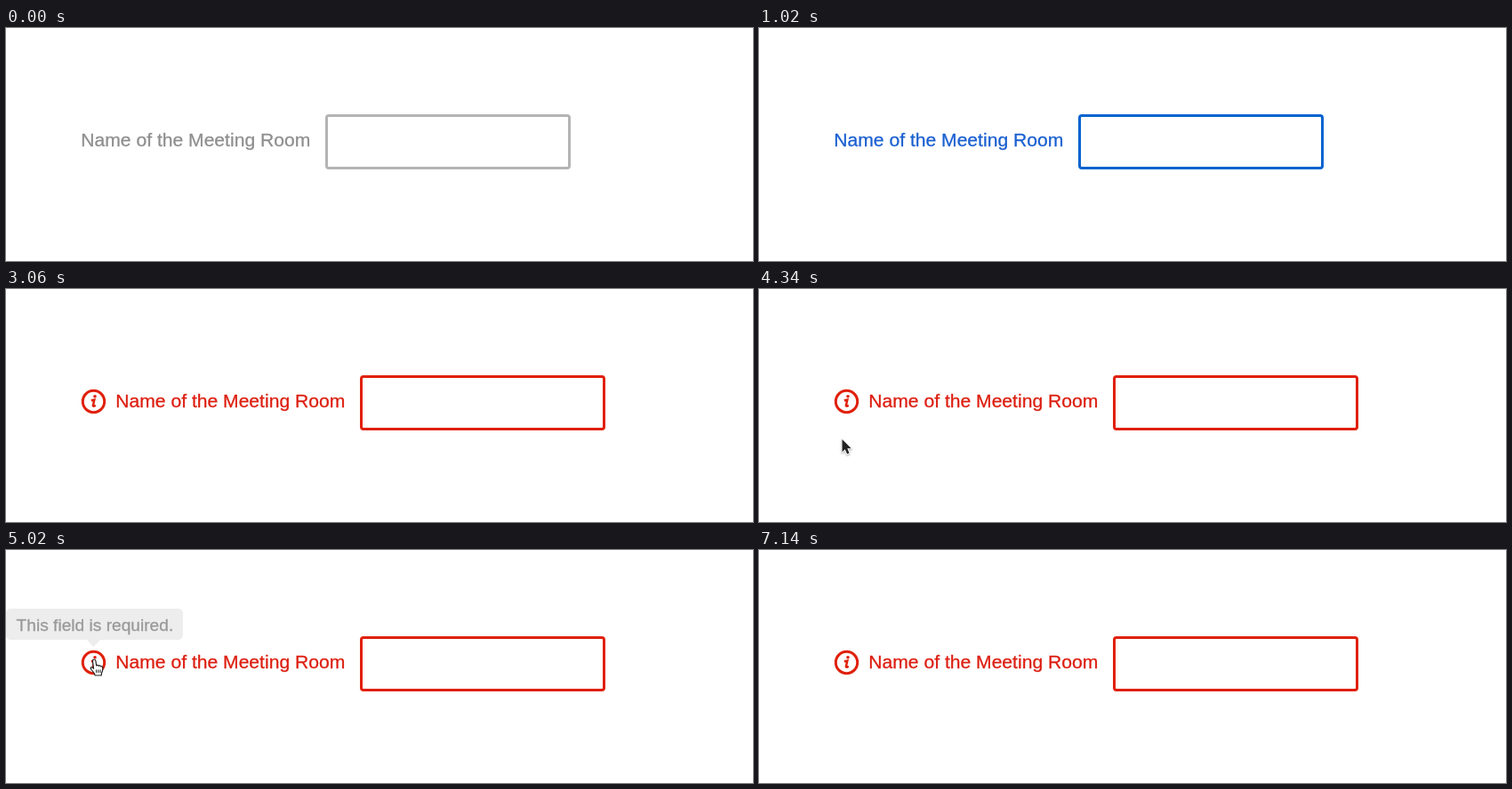
Recreate the animation shown at these times as an HTML page with a canvas. Size 840 by 262 pixels, loop 8 s.

```html
<!DOCTYPE html>
<html lang="en">
<head>
<meta charset="utf-8">
<title>Required field</title>
<style>
  html, body { margin: 0; width: 100%; height: 100%; overflow: hidden; background: #fff; }
  canvas { display: block; width: 840px; height: 262px; }
</style>
</head>
<body>
<canvas id="stage" width="840" height="262"></canvas>
<script>
const ctx = document.getElementById('stage').getContext('2d');
const LOOP = 8000, STEP = 40;
const FONT = '"Liberation Sans", Arial, Helvetica, sans-serif';

const GRAY_TEXT = [142, 142, 142], GRAY_LINE = [180, 180, 180];
const BLUE_TEXT = [26, 95, 208], BLUE_LINE = [4, 99, 207];
const RED_TEXT = [220, 30, 16], RED_LINE = [224, 32, 10];

const ARROW = new Path2D('M0 0V14.2L3.3 11.2 5.6 16.6 8 15.6 5.8 10.3H10.2Z');
const HAND = new Path2D('M-.5 2Q-.5 0 1.2 0Q2.8 0 3 2L3.6 7Q5 5.6 6.2 7.4Q7.6 6.2 8.6 8' +
  'Q10.5 7.4 10.8 9.5L10.5 13 9.3 16V18H2L1.6 16-2 11.5Q-3.6 9.4-2 8.8Q-.8 8.6.5 10.3Z');
const HAND_LINES = new Path2D('M3.6 11.5V15M5.8 11.5V15M8 11.5V15');
const INFO_STEM = new Path2D('M95.8 125.2L99.4 124.6 97.8 131.2Q97.8 132.4 100.8 130.9');

const clamp = v => Math.max(0, Math.min(1, v));
const span = (t, a, b) => clamp((t - a) / (b - a));
const ease = p => p * p * (3 - 2 * p);
const lerp = (a, b, p) => a + (b - a) * p;
const rgb = c => `rgb(${c.map(Math.round).join(',')})`;
const mix = (a, b, p) => rgb(a.map((v, i) => lerp(v, b[i], p)));

function text(str, x, y, size, color) {
  ctx.font = `${size}px ${FONT}`;
  ctx.fillStyle = ctx.strokeStyle = color;
  ctx.lineWidth = 0.3;
  ctx.fillText(str, x, y);
  ctx.strokeText(str, x, y);
}

function field(shift, textColor, lineColor) {
  text('Name of the Meeting Room', 84.3 + shift, 133, 21.1, textColor);
  ctx.strokeStyle = lineColor;
  ctx.lineWidth = 3;
  ctx.beginPath();
  ctx.roundRect(360.5 + shift, 98.5, 273, 59, 2.5);
  ctx.stroke();
}

function infoIcon(alpha) {
  ctx.save();
  ctx.globalAlpha = alpha;
  ctx.strokeStyle = ctx.fillStyle = rgb(RED_LINE);
  ctx.lineWidth = 3;
  ctx.beginPath();
  ctx.arc(98.5, 126.5, 12.2, 0, 7);
  ctx.stroke();
  ctx.lineWidth = 2.4;
  ctx.stroke(INFO_STEM);
  ctx.beginPath();
  ctx.arc(100, 120.8, 1.8, 0, 7);
  ctx.fill();
  ctx.restore();
}

function tooltip(alpha) {
  ctx.save();
  ctx.globalAlpha = alpha;
  ctx.fillStyle = '#ededed';
  ctx.beginPath();
  ctx.roundRect(0, 66, 199, 35, 5);
  ctx.moveTo(91, 101);
  ctx.lineTo(106, 101);
  ctx.lineTo(98.5, 109);
  ctx.fill();
  text('This field is required.', 11.6, 91, 19.15, '#999');
  ctx.restore();
}

function arrow(x, y) {
  ctx.save();
  ctx.translate(x, y);
  ctx.lineJoin = 'round';
  ctx.shadowColor = 'rgba(0,0,0,.35)';
  ctx.shadowBlur = 2;
  ctx.shadowOffsetY = 1;
  ctx.strokeStyle = '#fff';
  ctx.lineWidth = 2;
  ctx.stroke(ARROW);
  ctx.shadowColor = 'transparent';
  ctx.fillStyle = '#222';
  ctx.fill(ARROW);
  ctx.restore();
}

function hand(x, y) {
  ctx.save();
  ctx.translate(x, y);
  ctx.lineJoin = 'round';
  ctx.fillStyle = '#fff';
  ctx.strokeStyle = '#222';
  ctx.lineWidth = 1.2;
  ctx.fill(HAND);
  ctx.stroke(HAND);
  ctx.lineWidth = 1;
  ctx.stroke(HAND_LINES);
  ctx.restore();
}

function pointer(t) {
  if (t < 4340 || t >= 7060) return;
  const enter = ease(span(t, 4340, 4940));
  const leave = span(t, 6900, 7020);
  const x = lerp(93.5, 98, enter) + (t >= 6900 ? 1 + 6 * leave : 0);
  const y = lerp(169, 123, enter) + 20 * leave * leave;
  (Math.hypot(x - 98.5, y - 126.5) < 14 ? hand : arrow)(x, y);
}

function draw(t) {
  ctx.clearRect(0, 0, 840, 262);
  if (t < 2860) {
    const focus = span(t, 460, 700);
    field(0, mix(GRAY_TEXT, BLUE_TEXT, focus), mix(GRAY_LINE, BLUE_LINE, focus));
    const caret = (t >= 500 && t < 1020) || (t >= 1540 && t < 2020) || t >= 2540;
    if (caret) {
      ctx.fillStyle = '#222';
      ctx.fillRect(380, 115, 2, 25);
    }
    return;
  }
  // The error state slides in as three uneven jumps.
  const jump = t < 2980 ? 0 : t < 3060 ? 1 : 2;
  field([9, 34, 39][jump], rgb(RED_TEXT), mix(BLUE_LINE, RED_LINE, [0, 0.6, 1][jump]));
  infoIcon([0, 0.6, 1][jump]);
  const tip = span(t, 4700, 4980) * (1 - span(t, 6900, 7140));
  if (tip > 0) tooltip(tip);
  pointer(t);
}

const start = performance.now();
function tick() {
  const t = (performance.now() - start) % LOOP;
  draw(Math.floor((t - 20) / STEP) * STEP + 20);
  requestAnimationFrame(tick);
}
tick();
</script>
</body>
</html>
```
